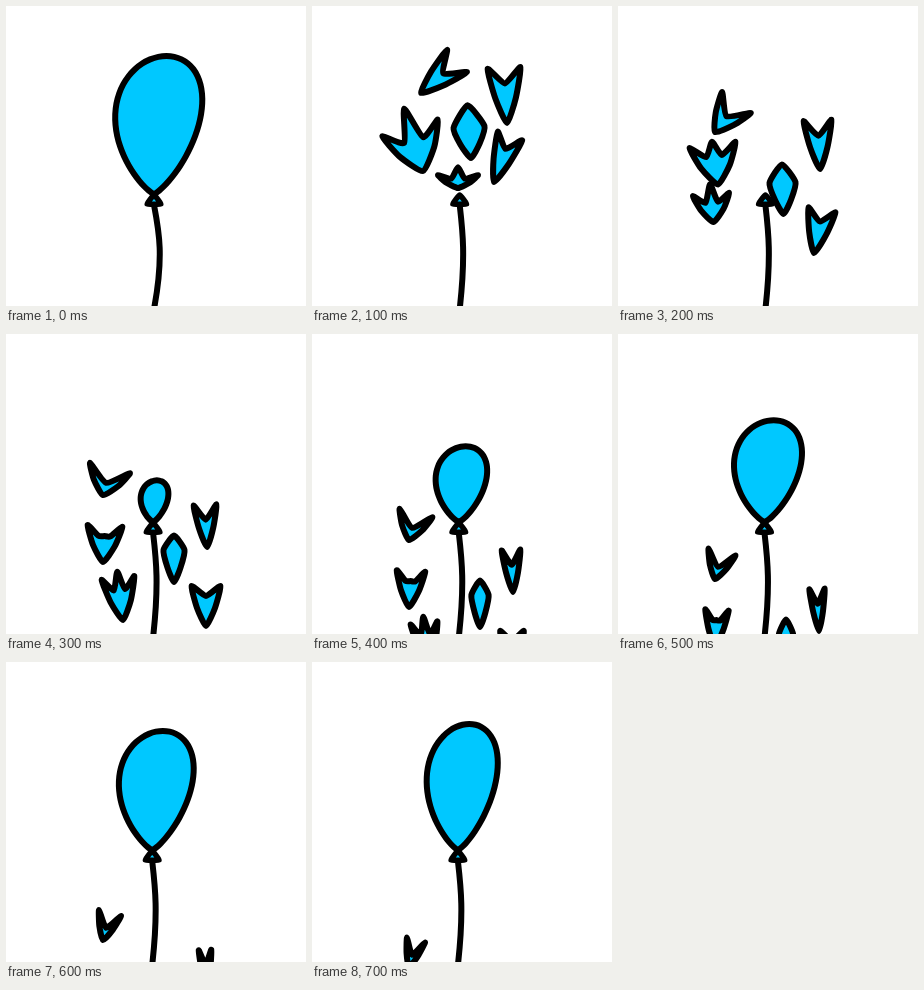
An HTML page with a canvas that plays this animation: 300 px wide and 300 px high, repeating every 0.8 s.

```html
<!DOCTYPE html>
<html lang="en">
<head>
<meta charset="utf-8">
<title>Balloon pop</title>
<style>
  html, body { margin: 0; width: 100%; height: 100%; overflow: hidden; background: #fff; }
  canvas { display: block; width: 100vw; height: 100vh; }
</style>
</head>
<body>
<canvas id="stage" width="300" height="300"></canvas>
<script>
const ctx = document.getElementById('stage').getContext('2d');
const STEP = 100, STEPS = 8;
const TIP_Y = 188;

// A shard flies from one pose to another, pushed off the straight line by drift.
// Pose: tail x, y, head x, y, spread of the horns, height of the crown between them.
const shards = [
  { from: [109, 87, 145, 55, 30, 0.62], to: [97, 161, 104, 134, 41, 0.45], drift: [-6, 2] },
  { from: [195, 117, 192, 62, 33, 0.72], to: [201, 213, 199, 171, 23, 0.65], drift: [4, -2] },
  { from: [111, 165, 98, 122, 58, 1.45], to: [97, 228, 99, 192, 35, 0.72], drift: [-4, -18], jagged: true },
  { from: [159, 152, 157, 121, 31, 1.7], to: [168, 248, 168, 216, 21, 1.45], drift: [2, 8] },
  { from: [182, 176, 198, 130, 26, 0.72], to: [200, 292, 200, 252, 29, 0.75], drift: [5, 13] },
  { from: [146, 182, 146, 169, 40, 1.6], to: [117, 286, 112, 244, 33, 1.15], drift: [-36, -18], jagged: true }
];

const mix = (a, b, u) => a + (b - a) * u;

// Smooth closed curve; a smaller tension keeps the corners sharper.
function blob(pts, tension) {
  const n = pts.length;
  const at = i => pts[(i + n) % n];
  ctx.beginPath();
  ctx.moveTo(...pts[0]);
  for (let i = 0; i < n; i++) {
    const [a, b, c, d] = [at(i - 1), at(i), at(i + 1), at(i + 2)];
    ctx.bezierCurveTo(
      b[0] + (c[0] - a[0]) * tension, b[1] + (c[1] - a[1]) * tension,
      c[0] - (d[0] - b[0]) * tension, c[1] - (d[1] - b[1]) * tension,
      c[0], c[1]);
  }
  ctx.closePath();
  ctx.fill();
  ctx.stroke();
}

function drawShard({ from, to, drift, jagged }, step) {
  const u = Math.min((step - 1) / 2, 1);
  const late = Math.max(step - 3, 0);
  const [tx, ty, hx, hy, spread, crown] = from.map((v, i) => mix(v, to[i], u));
  const arc = 4 * u * (1 - u);
  const x = tx + drift[0] * arc;
  const y = ty + drift[1] * arc + 48 * late - 3 * late * late;
  const ax = hx - tx, ay = hy - ty;
  const across = spread * 0.82 ** late / Math.hypot(ax, ay);
  const local = (along, side) => [
    x + ax * along - ay * across * side,
    y + ay * along + ax * across * side
  ];
  const dip = side => jagged ? [local(0.72, side)] : [];
  blob([
    local(0, 0), local(0.45, -0.31), local(1, -0.5),
    ...dip(-0.17), local(crown, 0), ...dip(0.17),
    local(1, 0.5), local(0.45, 0.31)
  ], 0.09);
}

// Teardrop standing on its tip and leaning right towards the top.
function drawBalloon(tipX, width, height) {
  const pts = [];
  for (let i = 0; i < 40; i++) {
    const a = i / 40 * 2 * Math.PI;
    const up = (1 - Math.cos(a)) / 2;
    const side = Math.sin(a) * up ** 0.3 / 0.84;
    pts.push([tipX + side * width / 2 + 0.09 * height * up * up, TIP_Y - height * up]);
  }
  blob(pts, 1 / 6);
}

function drawCord(x, bow) {
  ctx.beginPath();
  ctx.moveTo(x, TIP_Y + 11);
  ctx.bezierCurveTo(x + bow, 225, x + 2 * bow, 250, x, 303);
  ctx.stroke();
}

function draw(step) {
  const whole = step === 0;
  const tipX = 148 - 0.3 * step;

  ctx.fillStyle = '#fff';
  ctx.fillRect(0, 0, 300, 300);
  ctx.fillStyle = '#00c8ff';
  ctx.strokeStyle = '#000';
  ctx.lineJoin = ctx.lineCap = 'round';
  ctx.lineWidth = 6;

  drawCord(tipX, whole ? 5 : 3);
  if (whole) {
    drawBalloon(tipX, 86, 138);
  } else if (step > 2) {
    // The width fills out sooner than the height.
    const u = (step - 2) / 5;
    drawBalloon(tipX, 74 * Math.sin(1.9 * u), 126 * (1 - (1 - u) ** 1.8));
  }
  ctx.lineWidth = 5.5;
  blob([[tipX, TIP_Y + 1], [tipX + 7, TIP_Y + 10], [tipX - 7, TIP_Y + 10]], 0.05);
  ctx.lineWidth = 6;
  if (!whole) shards.forEach(s => drawShard(s, step));
}

function tick() {
  draw(Math.floor(performance.now() / STEP) % STEPS);
  requestAnimationFrame(tick);
}
tick();
</script>
</body>
</html>
```
